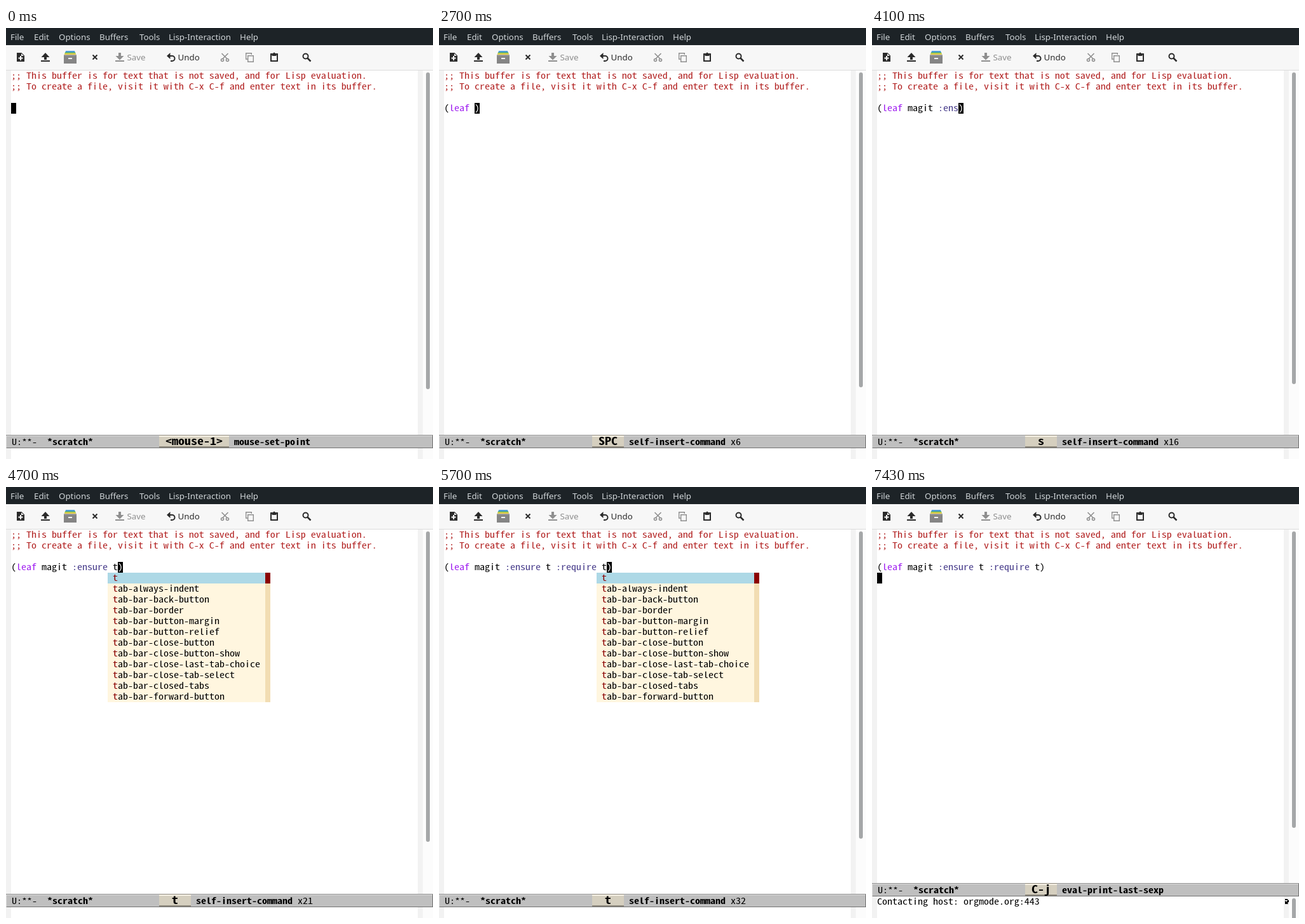
An HTML page that plays this animation: 672x679 px, repeating every 8000 ms.

```html
<!DOCTYPE html>
<html lang="en">
<head>
<meta charset="utf-8">
<title>Scratch buffer</title>
<style>
html, body { margin: 0; width: 100%; height: 100%; overflow: hidden; background: #fff; }
svg { display: block; width: 672px; height: 679px; }
text { white-space: pre; }
.ui { font: 13.333px "Noto Sans", sans-serif; }
.code { font-family: "Noto Sans Mono CJK JP", "Noto Sans Mono", monospace; font-variant-ligatures: none; }
.bold { font-weight: 700; }
.dark { fill: #2b2b2b; }
.dim { fill: #8f8f8f; }
.line { fill: none; stroke: #2b2b2b; stroke-width: 2; }
.line.dim { stroke: #8f8f8f; }
</style>
</head>
<body>
<svg viewBox="0 0 672 679">
  <rect width="672" height="679" fill="#fff"/>
  <path d="M0 67h8v612h-8zM648 67h8v612h-8z" fill="#f2f2f2"/>
  <path d="M656 67h16v612h-16z" fill="#fcfcfc"/>

  <rect width="672" height="27" fill="#1d2327"/>
  <g id="menu" class="ui" fill="#d0d5d8"></g>

  <rect y="27" width="672" height="39" fill="#f7f7f7"/>
  <rect y="66" width="672" height="1" fill="#dcdcdc"/>
  <g id="tools">
    <path class="dark" d="M17 39h7.500l4.500 4.500v9.500h-12zM24 40v4h4z" fill-rule="evenodd"/>
    <path d="M23 44v7M19.500 47.500h7" stroke="#f7f7f7" stroke-width="2"/>
    <path class="dark" d="M62 39l6.500 7h-4.500v4h-4v-4h-4.500zM55 51h14v2h-14z"/>
    <path d="M94 36h14l1 3h-16z" fill="#4a9fd8"/>
    <path d="M93 38.500h16l1 2.500h-18z" fill="#72b84a"/>
    <path d="M92.500 40h17l.5 3h-18z" fill="#f0d64c"/>
    <path d="M91 42h20v14h-20z" fill="#858585"/>
    <path d="M91 42h20v2h-20z" fill="#9b9b9b"/>
    <path d="M98 47h6v2h-6z" fill="#f4f4f4"/>
    <path class="line" d="M136.500 42.500l7 7M143.500 42.500l-7 7"/>
    <path class="dim" d="M177 39h4v5h4.500l-6.500 6.500l-6.500-6.500h4.500zM172 51h14v2h-14z"/>
    <path class="line" d="M256 44h5.500a4 4 0 0 1 0 8h-2.500"/>
    <path class="dark" d="M253 44l5.500-5v10z"/>
    <g class="line dim" style="stroke-width:1.6">
      <path d="M339.500 40l8.500 8.500M349.500 40l-8.500 8.500"/>
      <circle cx="340.500" cy="50.500" r="2"/><circle cx="348.500" cy="50.500" r="2"/>
    </g>
    <path class="line dim" style="stroke-width:1.4" d="M380 49h-2.300v-9.300h8.600v2.300M380.700 43.700h8.600v9.600h-8.600z"/>
    <path class="line" d="M417 41h10v11h-10z"/>
    <path class="dark" d="M418.500 40h2a1.500 1.500 0 0 1 3 0h2v4h-7z"/>
    <circle class="line" cx="471.500" cy="44.500" r="4"/>
    <path class="line" style="stroke-width:2.500" d="M474.500 47.500l5 5"/>
  </g>
  <g class="ui"><text class="dim" x="190.500" y="51">Save</text><text class="dark" x="270.500" y="51">Undo</text></g>

  <rect id="thumb" x="661" y="70" width="6" rx="3" fill="#a5a7a8"/>

  <g class="code" id="buffer">
    <text x="8" y="80" fill="#b22222">;; This buffer is for text that is not saved, and for Lisp evaluation.</text>
    <text x="8" y="97" fill="#b22222">;; To create a file, visit it with C-x C-f and enter text in its buffer.</text>
    <text id="expr" x="8" y="131"></text>
    <rect id="cursor" width="8" height="17"/>
    <text id="under" y="131" fill="#fff">)</text>
    <g id="popup"></g>
  </g>

  <g id="modeline" class="code">
    <rect y="641" width="672" height="21" fill="#bfbfbf"/>
    <path d="M0 641h672v1h-672z" fill="#8c8c8c"/>
    <path d="M0 642h671v1h-670v18h-1z" fill="#dedede"/>
    <path d="M1 661h670v-19h1v20h-671z" fill="#737373"/>
    <rect id="keybox" x="241" y="642" height="19" fill="#d5cfbf"/>
    <rect id="keytop" x="241" y="642" height="2" fill="#f5f0e4"/>
    <rect id="keyline" x="241" y="641" height="1" fill="#8c877c"/>
    <rect id="keyfoot" x="241" y="659" height="2" fill="#8c877c"/>
    <text x="9" y="657">U:**-</text>
    <text x="65" y="657" class="bold">*scratch*</text>
    <text id="key" x="251" y="657" class="bold"></text>
    <text id="cmd" y="657" class="bold"></text>
    <text id="count" x="459" y="657"></text>
  </g>
  <g id="echo" class="code">
    <text id="message" x="8" y="658"></text>
    <path d="M661 679v-28a3 3 0 0 1 6 0v28z" fill="#a5a7a8"/>
    <path id="wrap"/>
  </g>
</svg>
<script>
const $ = id => document.getElementById(id);
const LOOP = 8000, CELL = 8, ROW = 17, TOP = 118;
const EXPR = "(leaf magit :ensure t :require t)";
const KEY_TIMES = [
  2200, 2530, 2570, 2600, 2670, 2700,
  3330, 3400, 3470, 3570, 3630,
  3770, 3830, 3930, 4000, 4070, 4170, 4270, 4370, 4670, 4700,
  4870, 5170, 5230, 5270, 5330, 5400, 5470, 5530, 5570, 5630, 5700, 5830
];
const BLINKS = [[30, 370], [670, 1030], [1370, 1670], [2030, 2200], [3030, 3330], [6170, 6500]];
const EVAL = 6500, GROW = 6570;
const HOSTS = [[GROW, "elpa.gnu.org"], [7370, "melpa.org"], [7430, "orgmode.org"]];
const POPUPS = [[4700, 4870, 160], [5700, 5830, 248]];
const NAMES = ["", "ab-always-indent"].concat(
  ["back-button", "border", "button-margin", "button-relief", "close-button", "close-button-show",
   "close-last-tab-choice", "close-tab-select", "closed-tabs", "forward-button"].map(s => "ab-bar-" + s));

const within = (t, [a, b]) => t >= a && t < b;
const show = (el, on) => el.setAttribute("visibility", on ? "visible" : "hidden");
const attr = (id, name, value) => $(id).setAttribute(name, value);

// Size the face for an eight pixel cell; a half-width face is tall, so lower it to normal proportions.
function fitFont() {
  const ctx = document.createElement("canvas").getContext("2d");
  ctx.font = '100px "Noto Sans Mono CJK JP", "Noto Sans Mono", monospace';
  const advance = ctx.measureText("0").width / 100;
  const size = CELL / advance, aspect = Math.min(1, advance / .6);
  document.querySelectorAll(".code").forEach(el => el.style.fontSize = size + "px");
  $("key").style.fontSize = size * 1.25 + "px";
  document.querySelectorAll(".code text").forEach(el => {
    el.setAttribute("transform", `translate(0 ${el.getAttribute("y")}) scale(1 ${aspect})`);
    el.removeAttribute("y");
  });
}

function buildStatic() {
  const menu = [[7, "File"], [44, "Edit"], [83, "Options"], [147, "Buffers"], [210, "Tools"],
    [256, "Lisp-Interaction"], [368, "Help"]];
  $("menu").innerHTML = menu.map(([x, s]) => `<text x="${x}" y="19">${s}</text>`).join("");

  const h = NAMES.length * ROW;
  $("popup").innerHTML = `<rect width="248" height="${h}" fill="#fff6df"/>
    <rect width="248" height="17" fill="#add8e6"/>
    <rect x="248" width="8" height="${h}" fill="#f2ddb3"/>
    <rect x="248" width="8" height="17" fill="#8b0000"/>` +
    NAMES.map((s, i) => `<text x="8" y="${i * ROW + 13}"><tspan fill="#8b0000">t</tspan>${s}</text>`).join("");

  const arrow = [0x3c, 0x3e, 0x03, 0x27, 0x3f, 0x3e, 0x3c, 0x3e];
  let d = "";
  arrow.forEach((bits, y) => {
    for (let x = 0; x < 8; x++) if (bits >> (7 - x) & 1) d += `M${648 + x} ${649 + y}h1v1h-1z`;
  });
  attr("wrap", "d", d);
}

function colour(code) {
  return code
    .replace(/:\w*/g, '<tspan fill="#483d8b">$&</tspan>')
    .replace(/^\(leaf/, '(<tspan fill="#a020f0">leaf</tspan>');
}

function drawKey(n, done) {
  const last = EXPR[n - 1];
  const key = done ? "C-j" : !n ? "<mouse-1>" : last === " " ? "SPC" : last;
  const cmd = done ? "eval-print-last-sexp" : n ? "self-insert-command" : "mouse-set-point";
  const wide = n ? 50 : 110;
  for (const id of ["keybox", "keytop", "keyline", "keyfoot"]) attr(id, "width", wide);
  attr("key", "x", key.length === 1 ? 261 : 251);
  attr("cmd", "x", 249 + wide);
  $("key").textContent = key;
  $("cmd").textContent = cmd;
  $("count").textContent = n > 1 && !done ? "x" + n : "";
}

function draw(t) {
  const n = KEY_TIMES.filter(k => t >= k).length;
  const done = t >= EVAL, grown = t >= GROW, closed = n === EXPR.length;
  const code = EXPR.slice(0, n) + (n && !closed ? ")" : "");
  const lit = !BLINKS.some(b => within(t, b));
  const x = done ? 8 : 8 + n * CELL;

  $("expr").innerHTML = colour(code);
  attr("cursor", "x", x);
  attr("cursor", "y", done ? TOP + ROW : TOP);
  show($("cursor"), lit);
  attr("under", "x", x);
  show($("under"), lit && n && !closed);

  const popup = POPUPS.find(p => within(t, p));
  show($("popup"), popup);
  if (popup) attr("popup", "transform", `translate(${popup[2]} ${TOP + ROW})`);

  drawKey(n, done);
  attr("modeline", "transform", `translate(0 ${grown ? -ROW : 0})`);
  show($("echo"), grown);
  const host = HOSTS.filter(h => t >= h[0]).pop();
  $("message").textContent = host ? `Contacting host: ${host[1]}:443` : "";

  const chars = code.length + (done ? 1 : 0);
  attr("thumb", "height", Math.round(499 - .45 * chars - (grown ? ROW : 0)));
}

function frame() {
  draw(performance.now() % LOOP);
  requestAnimationFrame(frame);
}

buildStatic();
fitFont();
frame();
</script>
</body>
</html>
```
